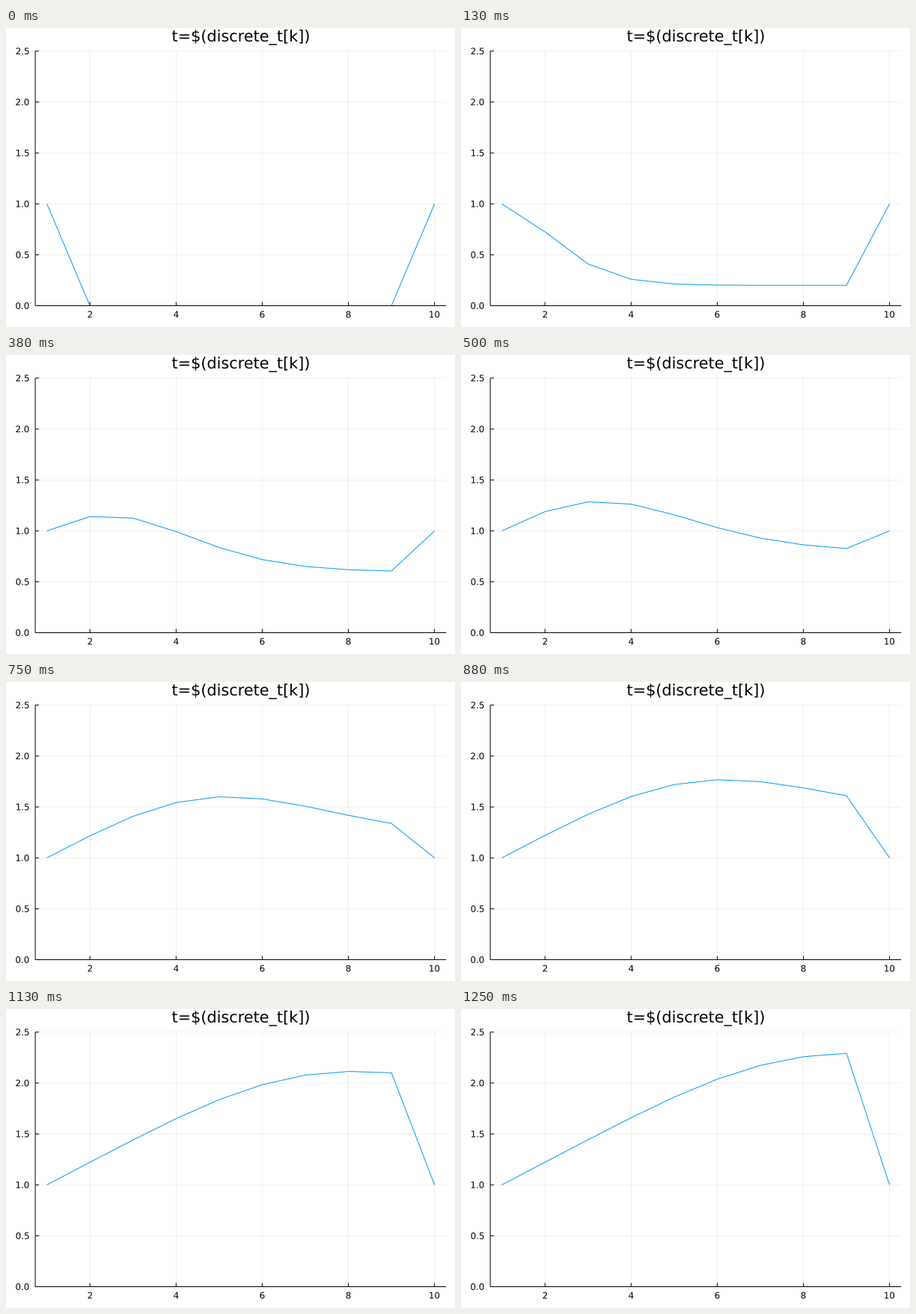
A matplotlib script that plays this animation: 600x400 px, repeating every 1.37 s.

```python
import math

import matplotlib.pyplot as plt
import numpy as np
from matplotlib.animation import FuncAnimation
from matplotlib.patches import PathPatch
from matplotlib.textpath import TextPath
from matplotlib.transforms import Affine2D

W, H, DPI = 600, 400, 100
LEFT, RIGHT, TOP, BOTTOM = 39.1, 588.2, 30.9, 371.5
LOOP, TICK, STEPS = 1370, 10, 11
HOLD = 125          # ms per time step
SPEED, SOURCE, DT = 9.0, 2.0, 0.1
N = 10

plt.rcParams["font.family"] = "DejaVu Sans"
fig = plt.figure(figsize=(W / DPI, H / DPI), dpi=DPI, facecolor="white")
ax = fig.add_axes([0, 0, 1, 1])
ax.set_xlim(0, W)
ax.set_ylim(H, 0)
ax.axis("off")


def px(x):
    return LEFT + (x - 0.73) / 9.54 * (RIGHT - LEFT)


def py(y):
    return BOTTOM - y / 2.5 * (BOTTOM - TOP)


def stroke(xs, ys, color="black", width=1.0, **kw):
    return ax.plot(xs, ys, color=color, linewidth=width * 72 / DPI, snap=False,
                   solid_capstyle="butt", solid_joinstyle="miter", **kw)[0]


def label(x, base, text, size, align=0.5):
    """Unhinted outline text; align is the anchor's share of the ink width."""
    path = TextPath((0, 0), text, size=size)
    box = path.get_extents()
    shift = x - box.x0 - align * box.width
    path = path.transformed(Affine2D().scale(1, -1).translate(shift, base))
    ax.add_patch(PathPatch(path, facecolor="black", linewidth=0, snap=False))


def profile(t):
    """Upwind advection with a constant source, both end values held at 1."""
    steady = 1 + SOURCE / SPEED * np.arange(N)
    a = SPEED * t
    u = np.ones(N)
    for j in range(1, N - 1):
        lag = sum(a**m / math.factorial(m) * steady[j - m] for m in range(j))
        u[j] = steady[j] - math.exp(-a) * lag
    return u


grid = dict(width=0.6, alpha=0.1, zorder=1)
for v in range(2, 11, 2):
    x = px(v)
    stroke([x, x], [TOP, BOTTOM], **grid)
    stroke([x, x], [BOTTOM, BOTTOM - 5], zorder=3)
    label(x, 387.4, str(v), 11.85)
for v in np.arange(0, 2.6, 0.5):
    y = py(v)
    stroke([LEFT, RIGHT], [y, y], **grid)
    stroke([LEFT, LEFT + 5], [y, y], zorder=3)
    label(30.5, y + 4.3, f"{v:.1f}", 11.85, align=1)
stroke([LEFT, LEFT], [TOP, BOTTOM], zorder=3)
stroke([LEFT, RIGHT], [BOTTOM, BOTTOM], zorder=3)
label((LEFT + RIGHT) / 2 - 0.3, 18, "t=$(discrete_t[k])", 20.8)

curve = stroke(px(np.arange(1, N + 1)), py(profile(0)), "#009AFA", zorder=2)


def update(i):
    k = min(i * TICK // HOLD, STEPS - 1)
    curve.set_ydata(py(profile(k * DT)))
    return curve,


anim = FuncAnimation(fig, update, frames=LOOP // TICK, interval=TICK,
                     repeat=True, repeat_delay=0)
plt.show()
```
